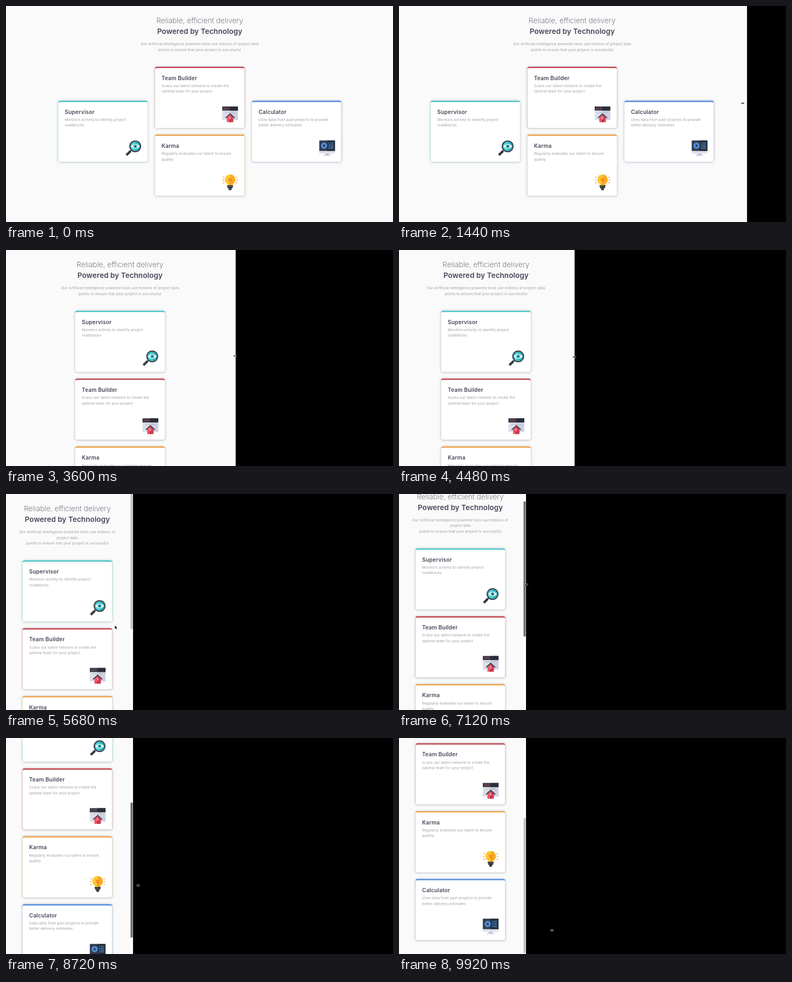
Write an HTML page with a canvas that moves like this. It is 716 px wide and 402 px high and loops after 10 s.

```html
<!DOCTYPE html>
<html lang="en">
<head>
<meta charset="utf-8">
<title>Responsive cards</title>
<style>
html, body { margin: 0; width: 100%; height: 100%; overflow: hidden; background: #000; }
canvas { display: block; width: 716px; height: 402px; }
</style>
</head>
<body>
<canvas></canvas>
<script>
const canvas = document.querySelector('canvas');
const g = canvas.getContext('2d');
const dpr = window.devicePixelRatio || 1;
canvas.width = 716 * dpr;
canvas.height = 402 * dpr;

const CARD_W = 166, CARD_H = 114, STEP = 126.3;
const DARK = '#2f333d', INK = '#454759', GREY = '#9c9da5';

// Keyframes: [time, value, value...]
const widthKeys = [[0, 720], [1040, 686], [1440, 644], [2080, 559], [2320, 541],
  [3120, 469], [3600, 425], [4160, 370], [5120, 235]];
const scrollKeys = [[6800, 0], [7840, 72], [8880, 215], [9360, 240]];
const cursorKeys = [[0, 722, 180], [1040, 680, 181], [1440, 636, 181], [2080, 553, 181],
  [2320, 535.5, 181], [3120, 466, 190], [3600, 424, 197], [4160, 369, 199],
  [5120, 236, 200], [5360, 236, 200], [5680, 201.5, 245], [6320, 235, 151],
  [6600, 235, 151], [6720, 235, 155], [6800, 235, 155], [7840, 237, 199],
  [8880, 246, 288], [9360, 250, 306], [9560, 251, 318], [9920, 283, 358]];

function at(keys, t) {
  const n = keys.findIndex(k => k[0] > t);
  if (n === 0) return keys[0].slice(1);
  if (n < 0) return keys[keys.length - 1].slice(1);
  const a = keys[n - 1], b = keys[n], p = (t - a[0]) / (b[0] - a[0]);
  return a.slice(1).map((v, i) => v + (b[i + 1] - v) * p);
}

function setFont(weight, size, spacing) {
  g.font = `${weight} ${size}px Inter, "Open Sans", sans-serif`;
  g.letterSpacing = spacing + 'px';
}

function wrap(text, max) {
  const lines = [''];
  for (const word of text.split(' ')) {
    const last = lines.length - 1;
    const longer = lines[last] ? lines[last] + ' ' + word : word;
    if (lines[last] && g.measureText(longer).width > max) lines.push(word);
    else lines[last] = longer;
  }
  return lines;
}

const write = (lines, x, y) => lines.forEach((s, i) => g.fillText(s, x, y + i * 10.4));

function rect(color, x, y, w, h, r = 0) {
  g.fillStyle = color;
  g.beginPath();
  g.roundRect(x, y, w, h, r);
  g.fill();
}

function disc(color, x, y, r, from = 0, to = 7) {
  g.fillStyle = color;
  g.beginPath();
  g.arc(x, y, r, from, to);
  g.fill();
}

function shape(color, d) {
  g.fillStyle = color;
  g.fill(new Path2D(d));
}

function line(color, width, d) {
  g.strokeStyle = color;
  g.lineWidth = width;
  g.stroke(new Path2D(d));
}

function magnifier() {
  line(DARK, 2, 'M12 17L8 21');
  line(DARK, 4.4, 'M9.3 19.7L1.7 27.3');
  line('#59606c', 1, 'M8 19.4L1.5 26');
  disc('#3b414d', 18, 11, 11);
  disc('#43cbcd', 18, 11, 8.8);
  disc('#32b4bb', 18, 11, 8.8, -Math.PI / 2, Math.PI / 2);
  shape('#f4f7f8', 'M10 11Q18 1.8 26 11Q18 20.2 10 11Z');
  disc('#43c3c8', 18, 11, 3.6);
  disc('#2d4450', 18, 11, 1.6);
}

function house() {
  rect('#dcdfea', 0, 0, 29, 25);
  rect('#cdd0df', 14.5, 0, 14.5, 25);
  rect('#343a46', 0, 0, 29, 7.6);
  rect('#292e38', 14.5, 0, 14.5, 7.6);
  for (const x of [4, 7.5, 11]) disc('#d6505e', x, 3.8, 1);
  line('#b3b7c8', 1, 'M5 11H24');
  shape('#f25468', 'M8.5 20L14.5 14.5V29.3H8.5Z');
  shape('#d43d53', 'M20.5 20L14.5 14.5V29.3H20.5Z');
  line('#393b48', 1.8, 'M6 21.3L14.5 13.6L23 21.3');
  disc('#f4d9df', 14.5, 21, 1.2);
  rect('#a73346', 13.2, 25, 2.6, 4.3);
}

function bulb() {
  line('#f4ae43', 1.5,
    'M0 10.5H3.2M1 4.5L4 6M1 16.5L4 15M29 10.5H25.8M28 4.5L25 6M28 16.5L25 15');
  shape('#fdc830', 'M14.5 .2A9.6 9.6 0 0 0 9.5 18V21H14.5Z');
  shape('#f9ac20', 'M14.5 .2A9.6 9.6 0 0 1 19.5 18V21H14.5Z');
  line('#ee8423', 1.4, 'M14.5 20V9M10.5 7L14.5 11L18.5 7M11 13L14.5 10L18 13');
  disc('#f28a24', 14.5, 9.7, 2.2);
  rect('#343842', 8.8, 20.5, 11.4, 2.8, 1);
  rect('#2b2f38', 9.8, 23.3, 9.4, 2.7, 1);
  rect('#343842', 11.8, 26, 5.4, 3.4, 1);
}

function monitor() {
  rect('#b9bdce', 11, 23, 7, 5);
  rect('#d3d6e2', 7.5, 27, 14, 1.9, .8);
  rect('#dfe1eb', 0, 18, 29, 6.5, 1);
  rect('#343e4e', 0, 0, 29, 19.5, [1, 1, 0, 0]);
  rect('#29313f', 14.5, 0, 14.5, 19.5, [0, 1, 0, 0]);
  disc('#4b8fe2', 9, 9.8, 5.8);
  disc('#343e4e', 9, 9.8, 2.2);
  line('#4b8fe2', 1.3, 'M17 5H19M20.5 5H26M17 8.4H26M17 11.6H19M20.5 11.6H26M17 14.8H26');
}

const cards = [
  ['Supervisor', 'Monitors activity to identify project roadblocks', '#4fc7ca', magnifier],
  ['Team Builder', 'Scans our talent network to create the optimal team for your project', '#c1474f', house],
  ['Karma', 'Regularly evaluates our talent to ensure quality', '#eea44c', bulb],
  ['Calculator', 'Uses data from past projects to provide better delivery estimates', '#5290e0', monitor]
];

function drawCard([title, text, color, icon], x, y, w) {
  g.save();
  g.shadowColor = 'rgba(110,115,125,.5)';
  g.shadowBlur = 4 * dpr;
  g.shadowOffsetY = .4 * dpr;
  rect(color, x, y, w, CARD_H, 4);
  g.restore();
  const top = { x: 4, y: 1.5 };
  rect('#fff', x, y + 2.5, w, CARD_H - 2.5, [top, top, 4, 4]);

  g.textAlign = 'left';
  g.fillStyle = INK;
  setFont(600, 10, .22);
  g.fillText(title, x + 12.3, y + 24.6);
  g.fillStyle = GREY;
  setFont(400, 6.7, .1);
  write(wrap(text, w - 24.6), x + 12.3, y + 37.9);

  g.save();
  g.translate(x + 124.6, y + 74);
  icon();
  g.restore();
}

function drawPage(W, scroll) {
  const page = W - (W < 240 ? 8 : 3), mid = page / 2;
  rect('#fafafa', 0, 0, W, 402);
  g.save();
  g.beginPath();
  g.rect(0, 0, W, 402);
  g.clip();
  g.translate(0, -scroll);

  g.textAlign = 'center';
  g.fillStyle = INK;
  setFont(200, 13.6, .08);
  g.fillText('Reliable, efficient delivery', mid, 32);
  setFont(600, 13.4, .1);
  g.fillText('Powered by Technology', mid, 52);
  g.fillStyle = GREY;
  setFont(400, 6.7, .1);
  const intro = wrap('Our Artificial Intelligence powered tools use millions of project data', page - 42);
  intro.push('points to ensure that your project is successful');
  write(intro, mid, 73.2);

  const top = 113 + (intro.length - 2) * 10.4, x = mid - CARD_W / 2;
  if (W > 487) {
    const left = Math.max(mid - 262, 11.5);
    const side = Math.min(CARD_W, mid - 96.5 - left);
    drawCard(cards[0], left, top + STEP / 2, side);
    drawCard(cards[1], x, top, CARD_W);
    drawCard(cards[2], x, top + STEP, CARD_W);
    drawCard(cards[3], mid + 96.5, top + STEP / 2, side);
  } else {
    cards.forEach((card, i) => drawCard(card, x, top + i * STEP, CARD_W));
  }
  g.restore();
}

function drawCursor(x, y, arrow) {
  const d = arrow
    ? 'M0 0V6L1.4 4.8L2.4 7L3.4 6.5L2.4 4.4H4.2Z'
    : 'M-3 0L-1.2 -1.6V-.6H1.2V-1.6L3 0L1.2 1.6V.6H-1.2V1.6Z';
  g.save();
  g.translate(x, y);
  g.lineJoin = 'round';
  line('#fff', 1, d);
  shape('#000', d);
  g.restore();
}

function frame(now) {
  const t = now % 10000;
  const [W] = at(widthKeys, t), [scroll] = at(scrollKeys, t), [x, y] = at(cursorKeys, t);
  g.setTransform(dpr, 0, 0, dpr, 0, 0);
  rect('#000', 0, 0, 716, 402);
  drawPage(W, scroll);
  if (W < 240) {
    rect('#fcfcfc', W - 5.5, 0, 5.5, 402);
    const held = t > 6280 && t < 9640;
    rect(held ? '#6e6e6e' : '#c1c1c1', W - 4.6, scroll * 149 / 240, 4, 251.5, 1.5);
  }
  drawCursor(x, y, t > 5400 && t < 6320);
  requestAnimationFrame(frame);
}
requestAnimationFrame(frame);
</script>
</body>
</html>
```
